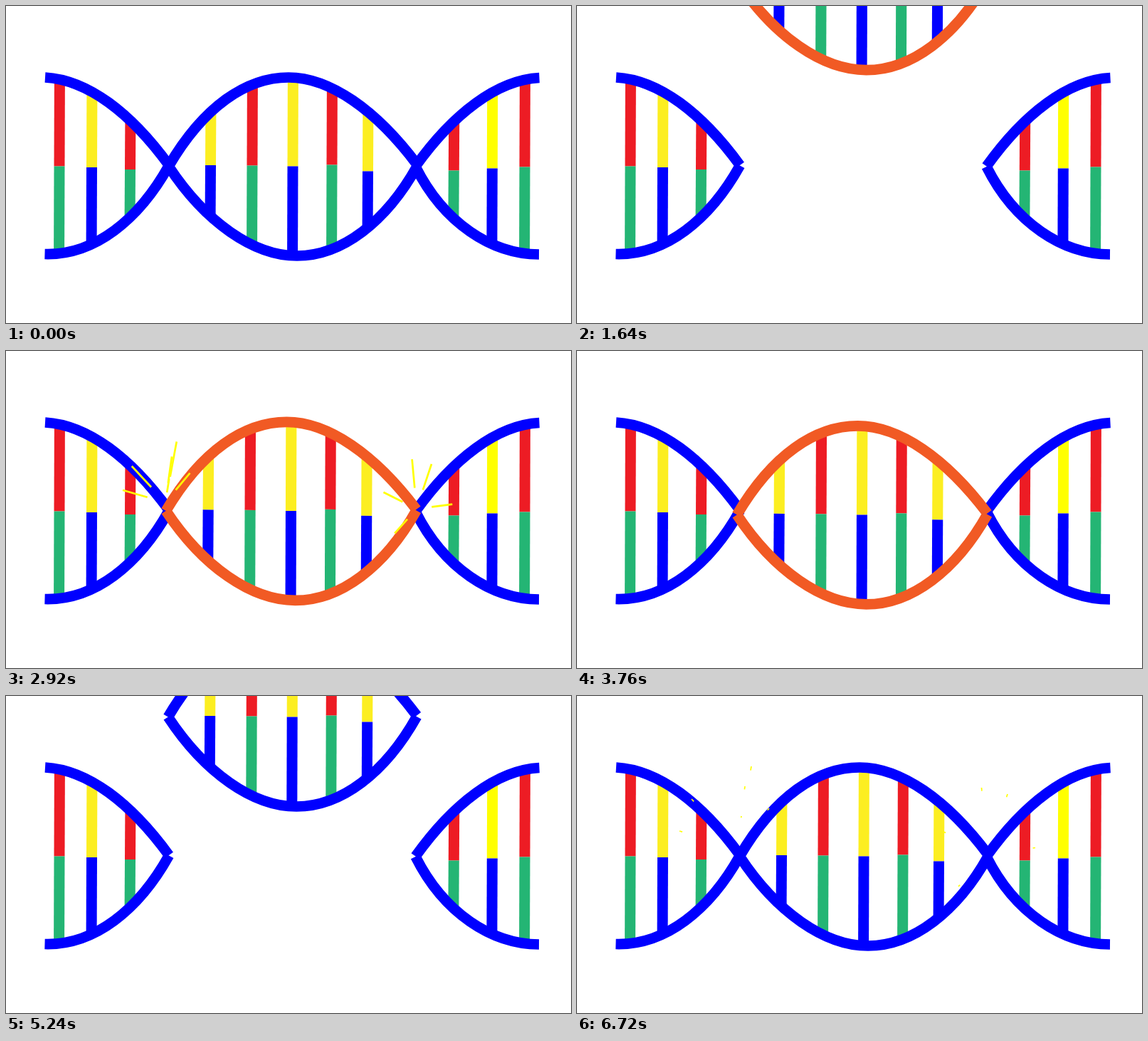
An HTML page with a canvas for the animation above (6.8 s loop, 794 by 446 pixels).

```html
<!DOCTYPE html>
<html lang="en">
<head>
<meta charset="utf-8">
<title>DNA segment exchange</title>
<style>
html, body { margin: 0; width: 100%; height: 100%; overflow: hidden; background: #fff; }
canvas { display: block; }
</style>
</head>
<body>
<canvas id="stage" width="794" height="446"></canvas>
<script>
const ctx = document.getElementById('stage').getContext('2d');
const LOOP = 6800, STEP = 40;
const BLUE = '#0000ff', ORANGE = '#f15a24', RED = '#ed1c24', GREEN = '#24b574', YELLOW = '#fcee21', BRIGHT = '#ffff00';

// Bars: x, top, join, bottom, upper colour, lower colour
const left = {
  strands: new Path2D('M55 100.5C115 104 175 150 229 224M54.5 349C125 351 187 300 229 224.5'),
  bars: [
    [75, 104, 225.5, 345, RED, GREEN],
    [120.5, 120, 227, 335, YELLOW, BLUE],
    [174.5, 160, 230, 296, RED, GREEN]
  ]
};
const middle = {
  strands: new Path2D('M228.5 225.5C278 141 338 100.5 397 100.5C455 100.5 520 146 578 223.5' +
    'M228.5 225.5C280 304 348 351.5 409 351.5C472 351.5 534 304 578 225'),
  bars: [
    [287.5, 147, 224, 293, YELLOW, BLUE],
    [346, 110, 224.5, 336, RED, GREEN],
    [403, 101, 225.5, 351, YELLOW, BLUE],
    [458, 115, 223.5, 342, RED, GREEN],
    [508.5, 149, 232.5, 313, YELLOW, BLUE]
  ]
};
const right = {
  strands: new Path2D('M575.5 225.5C628 152 690 104 749.5 101M575.5 226C615 305 682 349 749 349.5'),
  bars: [
    [629.3, 163, 231.5, 298, RED, GREEN],
    [683.3, 120, 228.5, 336, BRIGHT, BLUE],
    [729, 104, 226.5, 347, RED, GREEN]
  ]
};

// Vertical travel: [ms, offset]
const leave = [[0, 0], [225, 5.5], [440, 28], [640, 108], [720, 209], [785, 310], [825, 358], [900, 470]];
const enter = [[0, -360], [220, -300], [440, -196], [560, -70], [640, -8], [720, 26],
  [840, 30], [900, 30], [1000, 20], [1120, 7], [1240, 0]];

const bursts = [
  { from: [224, 213], tips: [[245, 99], [236, 127], [231, 169], [161, 145], [144, 190], [270, 158]] },
  { from: [577, 222], tips: [[568.5, 129], [605, 138], [515, 191], [644, 213.5], [536, 268]] }
];

// Smooth curve through the points, level at both ends
function track(pts, t) {
  const last = pts.length - 1;
  if (t <= 0) return pts[0][1];
  if (t >= pts[last][0]) return pts[last][1];
  const i = pts.findIndex(p => p[0] > t) - 1;
  const slope = k => k === 0 || k === last ? 0 :
    (pts[k + 1][1] - pts[k - 1][1]) / (pts[k + 1][0] - pts[k - 1][0]);
  const [a, ya] = pts[i], [b, yb] = pts[i + 1];
  const w = b - a, u = (t - a) / w, v = 1 - u;
  return ya * v * v * (1 + 2 * u) + yb * u * u * (3 - 2 * u) +
    w * u * v * (slope(i) * v - slope(i + 1) * u);
}

function line(x1, y1, x2, y2, color, width) {
  ctx.strokeStyle = color;
  ctx.lineWidth = width;
  ctx.beginPath();
  ctx.moveTo(x1, y1);
  ctx.lineTo(x2, y2);
  ctx.stroke();
}

function drawPart(part, color) {
  for (const [x, top, join, bottom, upper, lower] of part.bars) {
    line(x + 0.4, top, x, join, upper, 15);
    line(x, join, x - 0.4, bottom, lower, 15);
  }
  ctx.strokeStyle = color;
  ctx.lineWidth = 14.7;
  ctx.stroke(part.strands);
}

function drawMiddle(t) {
  const orange = t >= 1320 && t < 4800;
  ctx.save();
  if (orange) {
    const y = track(enter, t - 1320);
    const rise = y > 0 ? y * 0.68 : y;
    ctx.translate(578 - 1.3 + Math.max(0, rise) * 0.035, rise + track(leave, t - 3535) - 0.6);
    ctx.scale(1.007, 1);
    ctx.translate(-578, 0);
  } else {
    const y = t < 1320 ? track(leave, t - 40) : track(enter, t - 4800);
    ctx.translate(Math.min(0, y) * 0.004, y);
  }
  drawPart(middle, orange ? ORANGE : BLUE);
  ctx.restore();
}

// Sparks fly out from both joints in seven steps
function drawBursts(t) {
  const k = Math.floor((t - (t < 4000 ? 2760 : 6240)) / 80);
  if (k < 0 || k > 6) return;
  const head = Math.min(1, (k + 1) / 4), tail = k / 6 * 0.95;
  for (const { from: [x, y], tips } of bursts) {
    for (const [tx, ty] of tips) {
      const dx = tx - x, dy = ty - y;
      line(x + dx * tail, y + dy * tail, x + dx * head, y + dy * head, BRIGHT, 3.2 - k * 0.25);
    }
  }
}

function frame(now) {
  const t = Math.floor(now % LOOP / STEP) * STEP;
  ctx.clearRect(0, 0, 794, 446);
  drawPart(left, BLUE);
  drawPart(right, BLUE);
  drawMiddle(t);
  drawBursts(t);
  requestAnimationFrame(() => frame(performance.now() - start));
}

const start = performance.now();
frame(0);
</script>
</body>
</html>
```
